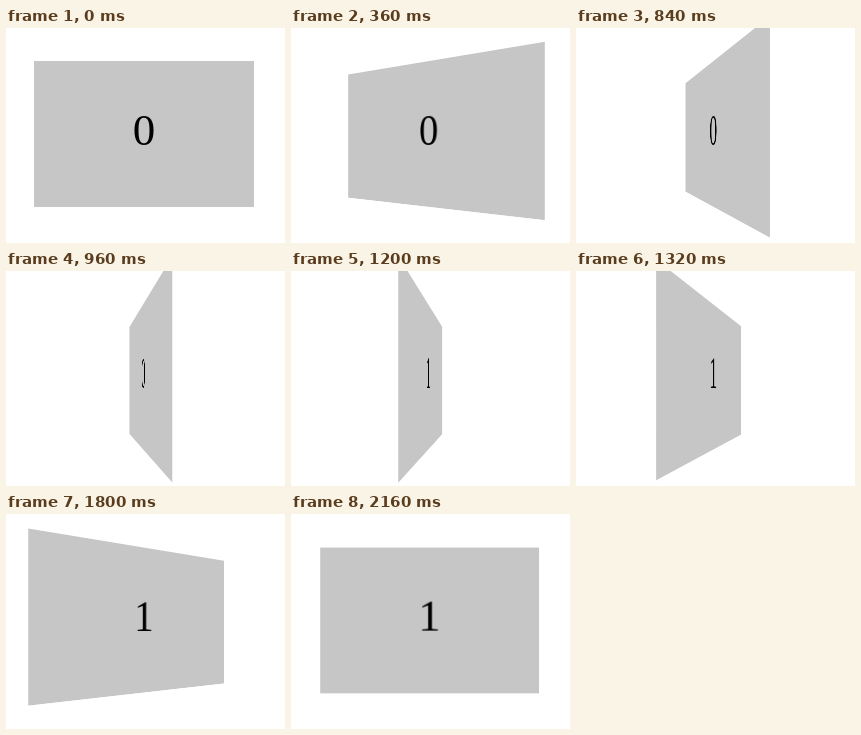
Recreate the animation shown at these times as an HTML page. Size 279 by 215 pixels, loop 2.28 s.

```html
<!DOCTYPE html>
<html lang="en">
<head>
<meta charset="utf-8">
<title>Flipping card</title>
<style>
  html, body {
    margin: 0;
    width: 100%;
    height: 100%;
    overflow: hidden;
    background: #fff;
  }
  .stage {
    position: relative;
    width: 279px;
    height: 215px;
    overflow: hidden;
    perspective: 300px;
    perspective-origin: 138px 119.5px;
  }
  .card {
    position: absolute;
    left: 28px;
    top: 33px;
    width: 220px;
    height: 146px;
    /* the axis lies just behind the card */
    transform-origin: 110.25px 73px -1px;
    transform-style: preserve-3d;
    /* 19 poses, 10 degrees apart, 120 ms each */
    animation: flip 2280ms steps(19, end) infinite;
  }
  .face {
    position: absolute;
    inset: 0;
    background: #c6c6c6;
    color: #000;
    font: 45px/138px "Liberation Serif", "Times New Roman", serif;
    text-align: center;
    backface-visibility: hidden;
  }
  .back { transform: rotateY(180deg); }
  @keyframes flip {
    from { transform: rotateY(0deg); }
    to { transform: rotateY(-190deg); }
  }
</style>
</head>
<body>
<div class="stage">
  <div class="card">
    <div class="face">0</div>
    <div class="face back">1</div>
  </div>
</div>
</body>
</html>
```
